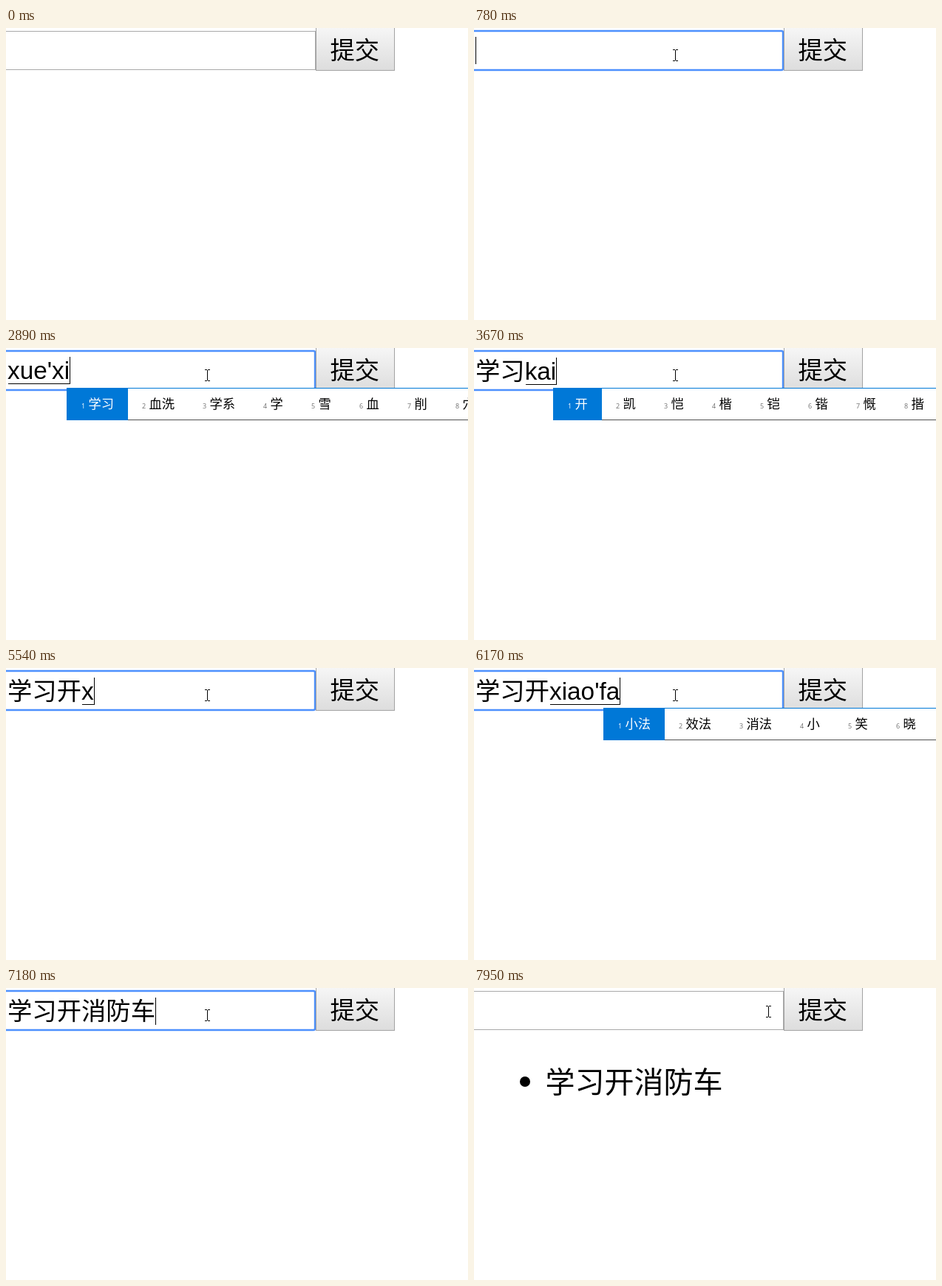
An HTML page with a canvas for the animation above (8000 ms loop, 625 by 396 pixels).

```html
<!DOCTYPE html>
<html lang="zh-CN">
<head>
<meta charset="utf-8">
<style>
html, body { margin: 0; width: 100%; height: 100%; overflow: hidden; background: #fff; }
canvas { display: block; }
</style>
</head>
<body>
<canvas id="stage" width="625" height="396"></canvas>
<script>
const ctx = document.getElementById('stage').getContext('2d');
const LOOP = 8000;
const SIZE = 100 / 3;
const CJK = '"Noto Sans CJK SC", "Noto Sans CJK", sans-serif';
const LATIN = '"Liberation Sans", Arial, sans-serif';
const BLUE = '#0078d7';

// [time, committed text, letters being composed, candidates, window x if lagging]
const TYPING = [
  [780, '', '', ''],
  [2270, '', 'x', ''],
  [2340, '', 'x', '想 小 下 系 向 像 行 新 先'],
  [2420, '', 'xu', '需 许 续 须 徐 序 虚 绪 蓄'],
  [2580, '', 'xue', '学 雪 血 削 穴 靴 薛 谑 鳕'],
  [2810, '', "xue'x", '学习 学校 学些 学 雪 血 削 穴'],
  [2890, '', "xue'xi", '学习 血洗 学系 学 雪 血 削 穴'],
  [3120, '学习', '', ''],
  [3440, '学习', 'k', ''],
  [3520, '学习', 'k', '看 可 快 开 块 口 卡 科 靠'],
  [3600, '学习', 'ka', '卡 咖 喀 咔 佧 咯 胩 开 看'],
  [3670, '学习', 'kai', '开 凯 恺 楷 铠 锴 慨 揩 忾'],
  [4130, '学习开', '', ''],
  [5540, '学习开', 'x', ''],
  [5620, '学习开', 'x', '想 小 下 系 向 像 行 新 先'],
  [5700, '学习开', 'xi', '系 西 洗 喜 细 吸 习 希 戏'],
  [5770, '学习开', 'xia', '下 吓 夏 瞎 虾 侠 峡 狭 霞'],
  [5850, '学习开', 'xiao', '小 笑 晓 效 消 校 销 萧 孝'],
  [6020, '学习开', "xiao'f", '小费 消费 小 笑 晓 效 消'],
  [6170, '学习开', "xiao'fa", '小法 效法 消法 小 笑 晓 效', 175],
  [6260, '学习开', "xiao'fa", '小法 效法 消法 小 笑 晓 效'],
  [6340, '学习开', "xiao'fan", '小饭 小贩 小范 小 笑 晓 效'],
  [6490, '学习开', "xiao'fang", '消防 小房 小方 小 笑 晓 效'],
  [6570, '学习开', "xiao'fang'c", '消防车 消防 小房 小方 小 笑'],
  [6720, '学习开', "xiao'fang'ch", '消防车 消防处 消防 小房 小 笑'],
  [6800, '学习开', "xiao'fang'che", '消防车 消防 小房 小方 小 笑'],
  [7180, '学习开消防车', '', '']
];

const PRESS = 7720, SUBMIT = 7800;

// [time, x, y], held until the next entry
const POINTER = [
  [260, 458, 336], [330, 424, 272], [410, 382, 204], [480, 344, 142],
  [560, 312, 92], [630, 290, 58], [710, 277, 42], [780, 272, 37],
  [7410, 300, 35], [7490, 368, 32], [7570, 430, 30], [7640, 452, 30],
  [7870, 432, 31], [7950, 398, 32]
];

const at = (rows, t) => rows.reduce((last, row) => row[0] <= t ? row : last, null);

function rect(x, y, w, h, color) {
  ctx.fillStyle = color;
  ctx.fillRect(x, y, w, h);
}

function text(str, x, y, size, family, color = '#000') {
  ctx.font = `${size}px ${family}`;
  ctx.fillStyle = color;
  ctx.fillText(str, x, y);
}

function drawInput(focused) {
  if (focused) {
    ctx.strokeStyle = '#4d90fe';
    ctx.lineWidth = 2.4;
    ctx.beginPath();
    ctx.roundRect(-10, 4, 428, 53, 2);
    ctx.stroke();
  } else {
    ctx.strokeStyle = '#a9a9a9';
    ctx.lineWidth = 1;
    ctx.strokeRect(-9.5, 4.5, 428, 52);
  }
}

function drawButton(pressed, hover) {
  const fill = ctx.createLinearGradient(0, 0, 0, 57);
  fill.addColorStop(0, pressed ? '#dddddd' : hover ? '#fafafa' : '#f6f6f6');
  fill.addColorStop(1, pressed ? '#f0f0f0' : hover ? '#e4e4e4' : '#dddddd');
  rect(419, -2, 107, 60, fill);
  ctx.strokeStyle = '#a3a3a3';
  ctx.lineWidth = 1;
  ctx.strokeRect(419.5, -3.5, 106, 61);
  text('提交', 438.5, 42, SIZE, CJK);
}

function drawField(done, letters, caret) {
  const base = done ? 43 : 42;
  const start = 2 + done.length * SIZE;
  text(done, 2, base, SIZE, CJK);
  text(letters, start, base, SIZE, LATIN);
  const end = start + ctx.measureText(letters).width;
  if (letters) rect(Math.round(start) + 1, base + 6, Math.round(end - start) - 1, 1, '#000');
  if (caret) rect(Math.round(end), base - 30, 1, 37, '#000');
  return end;
}

function drawCandidates(list, left) {
  const items = list.split(' ');
  const widths = items.map(s => 48 + s.length * 17);
  const total = widths.reduce((a, b) => a + b, 2);
  rect(left, 54, total, 44, '#fff');
  rect(left, 54, total, 1, BLUE);
  rect(left, 97, total, 1, '#505050');
  rect(left, 54, widths[0] + 1, 44, BLUE);
  let x = left;
  items.forEach((word, i) => {
    text(i + 1, x + 20, 82, 9, '"Open Sans", sans-serif', i ? '#707070' : '#fff');
    text(word, x + 29.5, 82, 17.3, CJK, i ? '#000' : '#fff');
    x += widths[i];
  });
}

function drawBeam(x, y) {
  rect(x, y - 7, 1, 14, '#000');
  for (const row of [y - 8, y + 7]) {
    rect(x - 3, row, 3, 1, '#000');
    rect(x + 1, row, 3, 1, '#000');
  }
}

function drawArrow(x, y) {
  ctx.beginPath();
  ctx.moveTo(x + .5, y + .5);
  for (const [dx, dy] of [[0, 16], [4, 12.5], [6.5, 18], [9, 17], [6.5, 11.5], [11.5, 11.5]])
    ctx.lineTo(x + .5 + dx, y + .5 + dy);
  ctx.closePath();
  ctx.fillStyle = '#fff';
  ctx.fill();
  ctx.strokeStyle = '#000';
  ctx.lineWidth = 1;
  ctx.stroke();
}

function drawPointer(x, y) {
  const overInput = x < 419 && y > 4 && y < 57;
  (overInput ? drawBeam : drawArrow)(x, y);
}

function drawList() {
  ctx.fillStyle = '#000';
  ctx.beginPath();
  ctx.arc(69, 127, 7, 0, Math.PI * 2);
  ctx.fill();
  text('学习开消防车', 96.5, 142, 40, CJK);
}

function caretShown(t) {
  return !(t >= 1330 && t < 1790) && !(t >= 4680 && t < 5220);
}

function draw(t) {
  rect(0, 0, 625, 396, '#fff');
  const pointer = at(POINTER, t);
  const state = at(TYPING, t);
  const focused = t >= 780 && t < PRESS;
  const hover = pointer && pointer[1] >= 419 && pointer[2] < 58;

  drawInput(focused);
  drawButton(t >= PRESS && t < SUBMIT, hover);
  if (state && t < SUBMIT) {
    const [, done, letters, list, anchor] = state;
    const end = drawField(done, letters, focused && caretShown(t));
    if (list) drawCandidates(list, anchor || Math.round(end - 4));
  }
  if (t >= SUBMIT) drawList();
  if (pointer) drawPointer(pointer[1], pointer[2]);
}

function tick() {
  draw(performance.now() % LOOP);
  requestAnimationFrame(tick);
}
tick();
</script>
</body>
</html>
```
